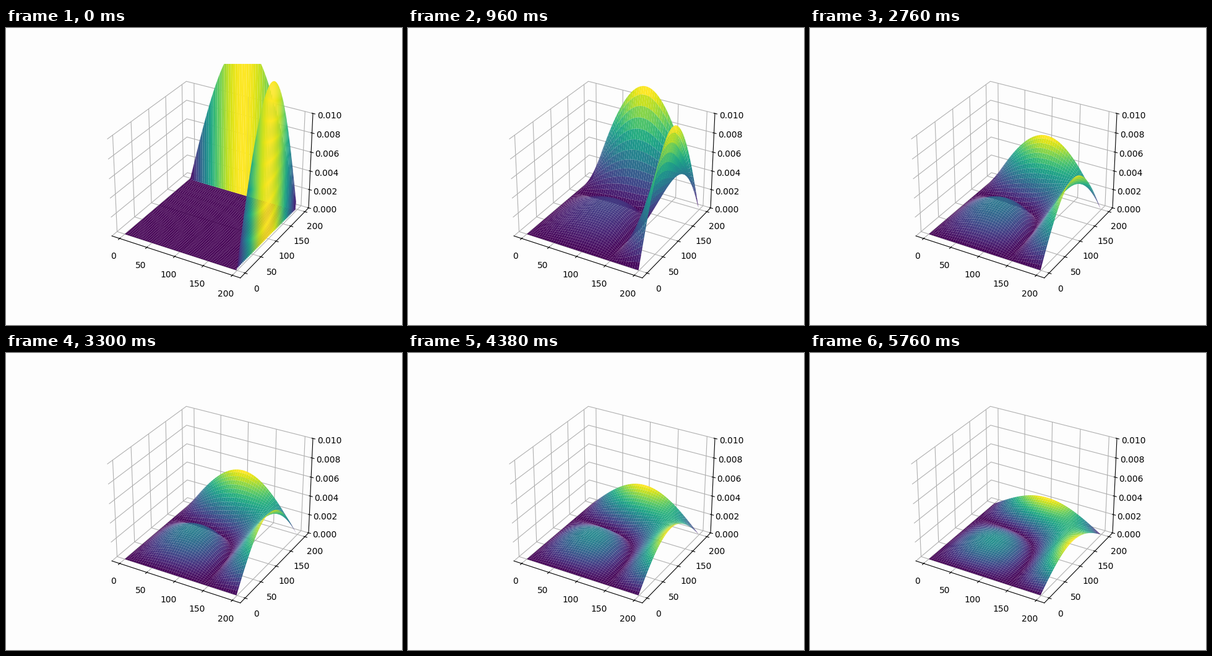
Recreate the animation shown at these times as a matplotlib script. Size 640 by 480 pixels, loop 5820 ms.

```python
import numpy as np
import matplotlib.pyplot as plt
from matplotlib.animation import FuncAnimation
from mpl_toolkits.mplot3d.art3d import Poly3DCollection

FRAMES, INTERVAL = 97, 60
N = 200            # grid points per side
H, DT = 1 / N, 0.001
STRIDE = 4
PAPER = "#fdfdfd"

# Heat equation by implicit Euler, solved in the discrete sine basis.
s = np.sin(np.pi * H * np.arange(N))
start = np.outer(s, s)
k = np.arange(1, N - 1)
basis = np.sin(np.pi * np.outer(k, k) / (N - 1))
lam = 4 / H**2 * np.sin(np.pi * k / (2 * (N - 1))) ** 2
damp = 1 / (1 + DT * (lam[:, None] + lam[None, :]))
coef = basis @ start[1:-1, 1:-1] @ basis * (2 / (N - 1)) ** 2


def error(n):
    """Absolute gap between the numerical and the analytic solution."""
    u = np.zeros((N, N))
    if n == 0:
        u[1:-1, 1:-1] = start[1:-1, 1:-1]
    else:
        u[1:-1, 1:-1] = basis @ (coef * damp**n) @ basis
    return np.abs(u - start * np.exp(-2 * np.pi**2 * DT * n))


def cell_rings():
    """Flat indices around the outline of every surface cell."""
    idx = np.arange(N * N).reshape(N, N)
    cuts = list(range(0, N - 1, STRIDE)) + [N - 1]
    spans = list(zip(cuts, cuts[1:]))
    return [
        np.concatenate([
            idx[r0, c0:c1],
            idx[r0:r1, c1],
            idx[r1, c1:c0:-1],
            idx[r1:r0:-1, c0],
        ])
        for r0, r1 in spans for c0, c1 in spans
    ]


rings = cell_rings()
sizes = np.array([len(r) for r in rings])
starts = np.concatenate([[0], np.cumsum(sizes)[:-1]])
order = np.concatenate(rings)
gx, gy = np.meshgrid(np.arange(N), np.arange(N))


def cells(n):
    z = error(n).ravel()
    pts = np.column_stack([gx.ravel(), gy.ravel(), z])
    mean_z = np.add.reduceat(z[order], starts) / sizes
    return [pts[r] for r in rings], mean_z


fig = plt.figure(figsize=(6.4, 4.8), dpi=100, facecolor=PAPER)
ax = fig.add_subplot(projection="3d", facecolor=PAPER)
# 5% data margin, then 1/48 of the widened range as view margin
pad = (N - 1) * (0.05 + 1.1 / 48)
ax.set_xlim(-pad, N - 1 + pad)
ax.set_ylim(-pad, N - 1 + pad)
ax.set_zlim(0, 0.01)
for axis in (ax.xaxis, ax.yaxis, ax.zaxis):
    axis.set_pane_color(PAPER)

surface = Poly3DCollection(cells(0)[0], cmap="viridis")
ax.add_collection3d(surface)


def update(n):
    verts, mean_z = cells(n)
    surface.set_verts(verts)
    surface.set_array(mean_z)
    surface.autoscale()
    return (surface,)


anim = FuncAnimation(fig, update, frames=FRAMES, interval=INTERVAL,
                     repeat=True, repeat_delay=0)
plt.show()
```
